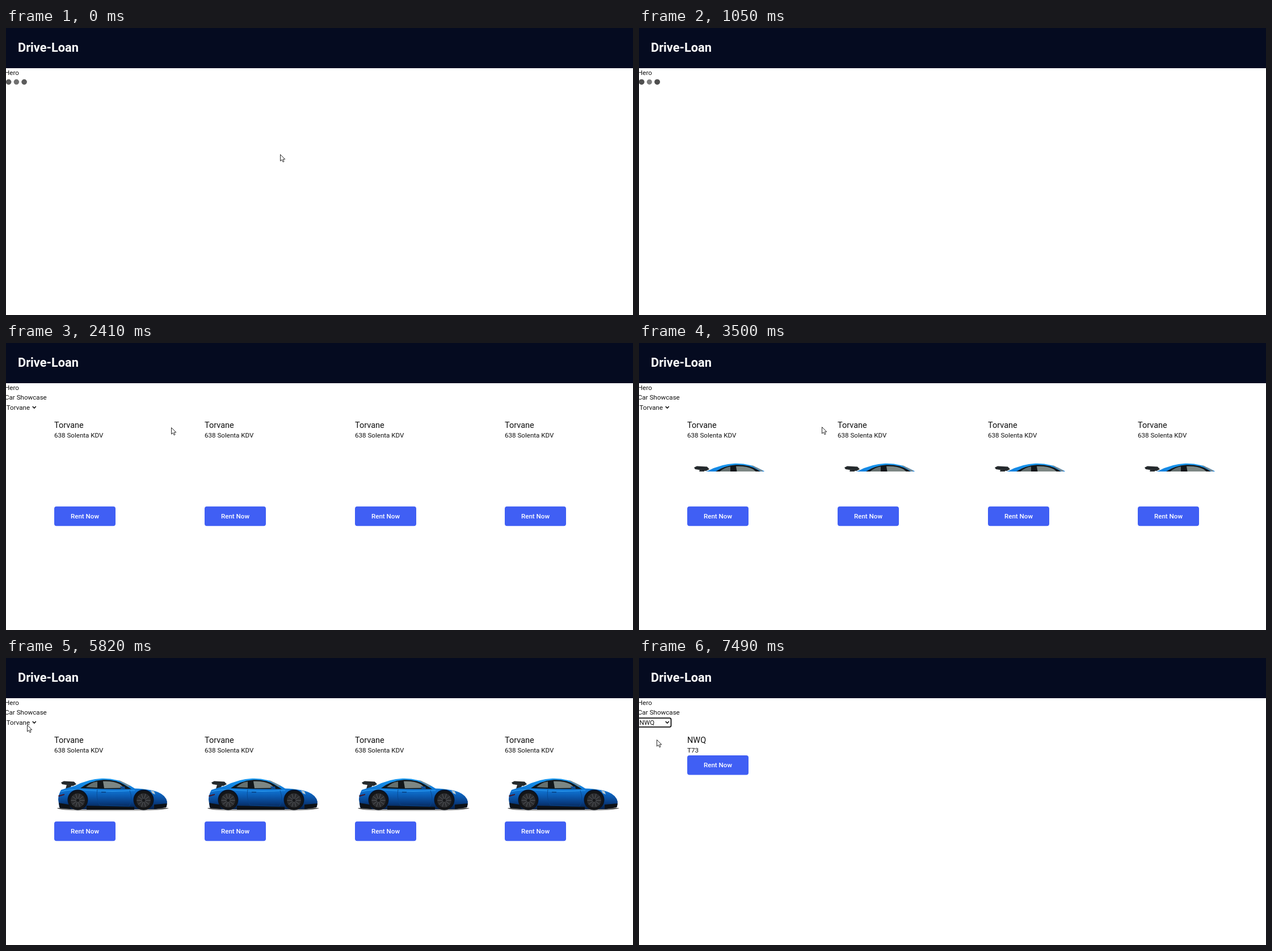
Write an HTML page with a canvas that moves like this. It is 1105 by 507 pixels and loops after 8000 ms.

```html
<!DOCTYPE html>
<html lang="en">
<head>
<meta charset="utf-8">
<title>Car rental page</title>
<style>
html, body { margin: 0; width: 100%; height: 100%; overflow: hidden; background: #fff; }
canvas { display: block; }
</style>
</head>
<body>
<canvas id="stage" width="1105" height="507"></canvas>
<script>
const ctx = document.getElementById('stage').getContext('2d');
const LOOP = 8000;
const INK = '#111', BLUE = '#405ff4';
const MAKES = ['Torvane', 'NWQ'];
const MODELS = ['638 Solenta KDV', 'T73'];

// Times of the page's state changes
const LOADED = 1120, SIZED = 2030, OPENED = 6540, CHOSEN = 7420;
// Lowest image row received so far: [time, y]
const ROWS = [[3160, 227], [3760, 236], [4430, 244], [5020, 290]];

const linear = k => k, easeIn = k => k * k, easeOut = k => 1 - (1 - k) ** 2;
// Pointer: [start, end, x0, y0, x1, y1, easing]; it rests after each move
const MOVES = [
  [0, 0, 483, 223, 483, 223, linear],
  [220, 830, 483, 223, 476, 26, easeIn],
  [1650, 2410, 510, 0, 291, 149, easeOut],
  [2810, 3150, 291, 149, 308, 139, easeOut],
  [3150, 3500, 308, 139, 322, 148, easeIn],
  [3760, 3760, 327, 157, 327, 157, linear],
  [4030, 4030, 326, 150, 326, 150, linear],
  [5020, 5020, 38, 121, 38, 121, linear],
  [5820, 5820, 37, 118, 37, 118, linear],
  [6540, 6610, 37, 118, 37, 120, linear],
  [6940, 7220, 37, 120, 31, 144, linear]
];

function pointerAt(t) {
  if (t >= 900 && t < 1650) return null;
  const [a, b, x0, y0, x1, y1, ease] = MOVES.filter(m => m[0] <= t).pop();
  const k = b > a ? ease(Math.min(1, (t - a) / (b - a))) : 1;
  return [x0 + (x1 - x0) * k, y0 + (y1 - y0) * k];
}

function text(s, x, y, size = 11.6, color = INK, weight = 400) {
  ctx.font = `${weight} ${size}px Roboto, sans-serif`;
  ctx.fillStyle = color;
  ctx.fillText(s, x, y);
}

function rect(x, y, w, h, color) {
  ctx.fillStyle = color;
  ctx.fillRect(x, y, w, h);
}

function disc(x, y, r, color) {
  ctx.fillStyle = color;
  ctx.beginPath();
  ctx.arc(x, y, r, 0, 7);
  ctx.fill();
}

function fill(d, color) {
  ctx.fillStyle = color;
  ctx.fill(new Path2D(d));
}

function stroke(d, color, width) {
  ctx.strokeStyle = color;
  ctx.lineWidth = width;
  ctx.stroke(new Path2D(d));
}

function fade(y0, y1, ...stops) {
  const g = ctx.createLinearGradient(0, y0, 0, y1);
  stops.forEach((c, i) => g.addColorStop(i / (stops.length - 1), c));
  return g;
}

function loader(t) {
  const phase = (t / 740 + 0.7725) % 1;
  const wave = 1 - Math.abs(1 - 2 * phase);
  for (let i = 0; i < 3; i++) {
    const u = i % 2 ? 1 - wave : wave;
    disc(4.6 + 13.75 * i, 95.3, 5.45 * (1 - 0.25 * u), `rgba(0,0,0,${1 - 0.8 * u})`);
  }
}

function wheel(x, y) {
  disc(x, y - 1, 18, '#071226');
  disc(x, y, 16.8, '#141517');
  disc(x, y, 12.5, '#2b2c2f');
  for (let i = 0; i < 10; i++) {
    const a = i * Math.PI / 5, c = Math.cos(a), s = Math.sin(a);
    stroke(`M${x + 3 * c},${y + 3 * s}L${x + 12 * c},${y + 12 * s}`, '#55585c', 1);
  }
  disc(x, y, 2.5, '#17181b');
}

function car(x, bottom) {
  ctx.save();
  ctx.beginPath();
  ctx.rect(x, 200, 220, bottom - 200);
  ctx.clip();
  ctx.translate(x, 0);

  fill('M5,265Q100,261 202,265Q190,271 100,271Q10,271 5,265Z', fade(264, 271, '#111', '#1110'));

  // Rear wing
  fill('M12,220L17,217.5L35,218.5L39,223L33,226L14,223Z', '#24292c');
  fill('M22,224L31,225L27,231L20,231Z', '#24292c');

  const paint = fade(212, 267, '#1b9af0', '#1488e4', '#0f74d2', '#0b58ae', '#083c80', '#051f47');
  fill('M9,264L7,250Q7,242 12,233Q24,229 36,226Q60,213.5 84,212.7Q110,211.8 133,225L142,230.5Q170,231.5 183,237Q197,243 199,254L198,263L178,267L30,267Z', paint);

  // Glass
  fill('M46,230Q62,217 86,215.2Q108,214.5 122,223L136,231.5Q100,232 46,230Z', '#11161a');
  fill('M56,228Q66,219.5 76,218.3L76,229Z', '#65706f');
  fill('M86,217.8Q104,216.8 116,223L124,229.5L88,230Z', '#7d8784');
  fill('M112,215.5L117,217L134,226L130,227Z', '#7f8a8c');
  fill('M116,227L124,227L125,231L118,232Z', '#0d4e94');

  // Body lines, lamps and sill
  stroke('M12,236Q30,231 50,233Q95,237 142,234', '#2f9ff4', 1.2);
  stroke('M76,232Q73,247 80,260L132,262Q139,249 133,234', '#084689', 0.8);
  stroke('M83,237L91,237', '#063d7c', 1.5);
  fill('M170,234L176,235.5L178,241L173,239Z', '#b9c9cf');
  fill('M7,243L18,240L18,242L8,245Z', '#4a1626');
  fill('M8,256L26,259L30,267L10,265Z', '#0e1217');
  fill('M57,261L141,263L141,268L57,268Z', '#0d1116');
  fill('M176,259L199,257L197,264L176,267Z', '#0e1217');
  wheel(41.5, 251.5);
  wheel(157.5, 251.5);
  ctx.restore();
}

function card(x, make, top, bottom) {
  text(MAKES[make], x, 149.6, 14.5);
  text(MODELS[make], x, 166.8);
  if (bottom) car(x, bottom);
  ctx.fillStyle = BLUE;
  ctx.beginPath();
  ctx.roundRect(x, top, 108, 34.5, 4);
  ctx.fill();
  ctx.textAlign = 'center';
  text('Rent Now', x + 54, top + 20.8, 11.6, '#fff', 500);
  ctx.textAlign = 'left';
}

function select(make, focused) {
  text(MAKES[make], 0.7, 117.6);
  stroke('M46.8,112L49.8,115L52.8,112', INK, 1.7);
  if (!focused) return;
  ctx.lineWidth = 1.8;
  ctx.strokeStyle = '#101010';
  ctx.beginPath();
  ctx.roundRect(-4, 106.2, 60.5, 15.6, 2.5);
  ctx.stroke();
}

function menu(active) {
  ctx.save();
  ctx.shadowColor = '#0006';
  ctx.shadowBlur = 5;
  ctx.shadowOffsetX = ctx.shadowOffsetY = 1.5;
  rect(-4, 121.5, 60.5, 31, '#666');
  ctx.restore();
  rect(-4, 122, 60, 30, '#fff');
  rect(-4, 122 + 14.5 * active, 60, 14.5, '#1e90ff');
  MAKES.forEach((name, i) => text(name, 1.5, 133 + 14.5 * i, 11.6, i === active ? '#fff' : INK));
}

function pointer([x, y]) {
  ctx.save();
  ctx.translate(x + 0.5, y + 0.5);
  const arrow = 'M0,0V11.5L2.7,9.1L4.6,13.2L6.5,12.4L4.7,8.4H8.3Z';
  fill(arrow, '#fff');
  stroke(arrow, '#111', 0.9);
  ctx.restore();
}

function draw(t) {
  const at = pointerAt(t);
  rect(0, 0, 1105, 507, '#fff');
  rect(0, 0, 1105, 71, '#050b20');
  text('Drive-Loan', 21, 42, 21.75, '#fff', 700);
  text('Hero', -2, 83);

  if (t < LOADED) loader(t);
  else {
    const make = t < CHOSEN ? 0 : 1;
    text('Car Showcase', -2, 100.2);
    select(make, make === 1);
    const row = ROWS.filter(r => r[0] <= t).pop();
    if (make) card(85, 1, 172);
    else for (let i = 0; i < 4; i++) {
      card(Math.round(85 + 264.8 * i), 0, t < SIZED ? 172 : 288.7, row && row[1]);
    }
    if (t >= OPENED && t < CHOSEN) menu(at[1] > 136 ? 1 : 0);
  }
  if (at) pointer(at);
}

const start = performance.now();
function tick() {
  draw((performance.now() - start) % LOOP);
  requestAnimationFrame(tick);
}
tick();
</script>
</body>
</html>
```
